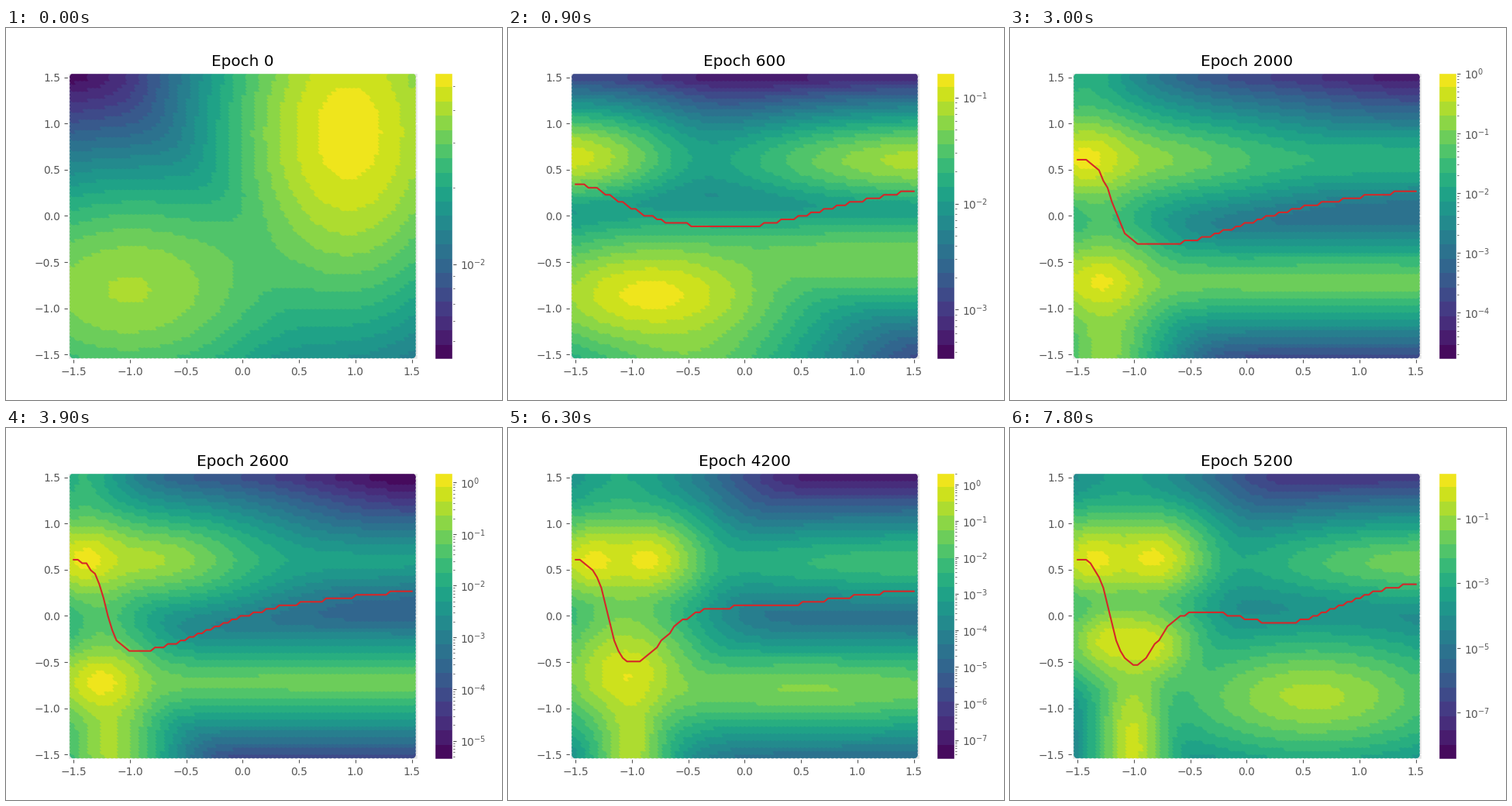
Write a matplotlib script that moves like this. It is 640 by 480 pixels and loops after 8 s.

```python
import matplotlib.pyplot as plt
import numpy as np
from matplotlib.animation import FuncAnimation
from matplotlib.cm import ScalarMappable
from matplotlib.colors import ListedColormap, LogNorm
from matplotlib.ticker import LogLocator, NullFormatter

plt.rcParams.update({
    "font.family": "DejaVu Sans", "font.size": 10, "axes.titlesize": 14.4,
    "axes.facecolor": "#E5E5E5", "axes.edgecolor": "white", "axes.linewidth": 1,
    "axes.grid": True, "grid.color": "white", "axes.axisbelow": True,
    "xtick.color": "#555555", "ytick.color": "#555555",
})

N = 80          # grid points per side
BANDS = 20      # colour steps, also the unit of all heights
STEP_FRAMES = 3
STEP_EPOCHS = 200
SHARPNESS = .6  # how crisply hills merge

xs = np.linspace(-1.5, 1.5, N)
spacing = xs[1] - xs[0]
grid_x, grid_y = (g.ravel() for g in np.meshgrid(xs, xs))


def hill(x, y, height, width, depth, bend=3):
    """Log density that is round at the top and falls linearly further out."""
    r = np.sqrt(1 + ((grid_x - x) / width) ** 2 + ((grid_y - y) / depth) ** 2)
    return height - bend * (r - 1)


def peak(x, y, height):
    return hill(x, y, height, .19, .18)


def ridge(x, y, height, reach):
    return hill(x, y, height, reach, .18)


def column(x, y, height, width=.18):
    return hill(x, y, height, width, .5)


def landscape(*hills):
    total = np.log(np.sum(np.exp(SHARPNESS * np.array(hills)), axis=0)) / SHARPNESS
    return np.clip(total, 0, BANDS - .01)


def curve(offset, slope, dip_x, dip, dip_width, rise, rise_x, rise_width, sag):
    """Straight trend with a dip, a steep rise on the left and a sag on the right."""
    return (offset + slope * xs
            + dip * np.exp(-((xs - dip_x) / dip_width) ** 2 / 2)
            + rise / (1 + np.exp((xs - rise_x) / rise_width))
            + sag * np.exp(-((xs - .37) / .42) ** 2 / 2))


# Moments of the training: step, decades of the colour scale, curve, landscape
scenes = [
    (0, (-2.3725, -1.2495), (.02, .15, .15, -.05, .5, .3, -1.12, .25, 0), landscape(
        hill(.95, .92, 19.6, .85, 1.5, 11),
        hill(-1.01, -.78, 17.1, 1.27, 1, 11),
        hill(0, -.4, 13.3, 1.2, .9, 11))),
    (3, (-3.465, -.767), (.02, .17, .15, -.14, .5, .68, -1.12, .2, 0), landscape(
        hill(-.82, -.83, 19.4, .64, .34, 5),
        hill(-.5, -1.4, 15.6, .6, .5, 5),
        hill(1.3, -.45, 16, 1.6, .3, 5),
        hill(-1.6, .66, 18.7, .5, .23, 5),
        hill(1.7, .62, 17.6, .95, .23, 5))),
    (6, (-4.001, -.22), (0, .2, -.3, -.11, .6, .88, -1.17, .085, 0), landscape(
        ridge(1.5, .64, 15.1, 3),
        ridge(.8, -.7, 15.4, 4),
        hill(-1.47, .64, 19.5, .26, .2),
        hill(-1.38, -.68, 18.8, .28, .22),
        column(-1.35, -1.4, 16.3),
        column(-1.45, 1.4, 12.2, .3))),
    (13, (-5.354, .186), (.09, .12, -.9, -.36, .55, .9, -1.215, .05, 0), landscape(
        peak(-1.39, .64, 19.3),
        peak(-1.25, -.7, 19.3),
        hill(-.85, .63, 17.2, .42, .19),
        ridge(1.3, .62, 11.2, 2),
        ridge(1, -.7, 15.3, 4),
        column(-1.17, -1.4, 17.2),
        column(-1.25, 0, 14),
        column(-1.4, 1.4, 13))),
    (17, (-7.298, .3), (.13, .09, -.98, -.53, .27, .7, -1.21, .037, 0), landscape(
        peak(-1.33, .62, 19.3),
        peak(-.87, .63, 19.3),
        hill(-1.06, -.64, 19.3, .25, .22),
        ridge(1.6, .6, 13.3, 1.8),
        ridge(.3, -.76, 15.8, 3),
        column(-1, -1.4, 17.6, .14),
        column(-1.05, 0, 15, .25),
        column(-1.1, 1.4, 12, .32))),
    (26, (-8.428, .412), (.16, .13, -1, -.56, .2, .68, -1.215, .045, -.28), landscape(
        peak(-1.33, .64, 19.3),
        peak(-.82, .65, 19.3),
        peak(-1.18, -.25, 18.5),
        peak(-.87, -.3, 18.5),
        ridge(1.7, .6, 15.8, .8),
        hill(.6, -.85, 17.4, .54, .26),
        column(-1, -1.4, 18.4, .13),
        column(-1.1, 1.4, 11, .35))),
]
steps, decades, shapes, surfaces = zip(*scenes)


def scene_at(step):
    """Decades, curve and landscape between the two nearest moments."""
    i = min(np.searchsorted(steps, step, side="right") - 1, len(steps) - 2)
    t = (step - steps[i]) / (steps[i + 1] - steps[i])
    if i == len(steps) - 2:
        t *= t  # the last change starts slowly
    span, shape, surface = (
        (1 - t) * np.asarray(items[i]) + t * np.asarray(items[i + 1])
        for items in (decades, shapes, surfaces))
    return span, curve(*shape), surface


fig = plt.figure(figsize=(6.4, 4.8), dpi=100, facecolor="white")
width = .775 / 1.1
ax = fig.add_axes([.125, .11, width, .77])
cax = fig.add_axes([.125 + width * 1.05, .11, width * .05, .77])
ax.set(xlim=(-1.55, 1.55), ylim=(-1.55, 1.55))
ax.set_xticks(np.arange(-1.5, 1.6, .5))
ax.set_yticks(np.arange(-1.5, 1.6, .5))
title = ax.set_title("Epoch 0")

cmap = ListedColormap(plt.get_cmap("viridis")((np.arange(BANDS) + .5) / BANDS))
dots = ax.scatter(grid_x, grid_y, c=surfaces[0], s=7.5 ** 2, linewidths=0,
                  cmap=cmap, vmin=0, vmax=BANDS)
line, = ax.plot(xs, xs, color="tab:red", lw=1.5)

scale = ScalarMappable(LogNorm(*10.0 ** np.array(decades[0])), cmap)
bar = fig.colorbar(scale, cax=cax, ticks=LogLocator(numticks=8))
bar.minorlocator = LogLocator(subs=np.arange(2, 10), numticks=8)
cax.yaxis.set_minor_formatter(NullFormatter())


def update(frame):
    step = frame // STEP_FRAMES
    span, ys, surface = scene_at(step)
    title.set_text(f"Epoch {step * STEP_EPOCHS}")
    dots.set_array(surface)
    line.set_ydata(np.round(ys / spacing) * spacing)
    line.set_visible(step > 0)
    scale.set_clim(*10.0 ** span)
    return dots, line, title


animation = FuncAnimation(fig, update, frames=80, interval=100, repeat=True, repeat_delay=0)
plt.show()
```
